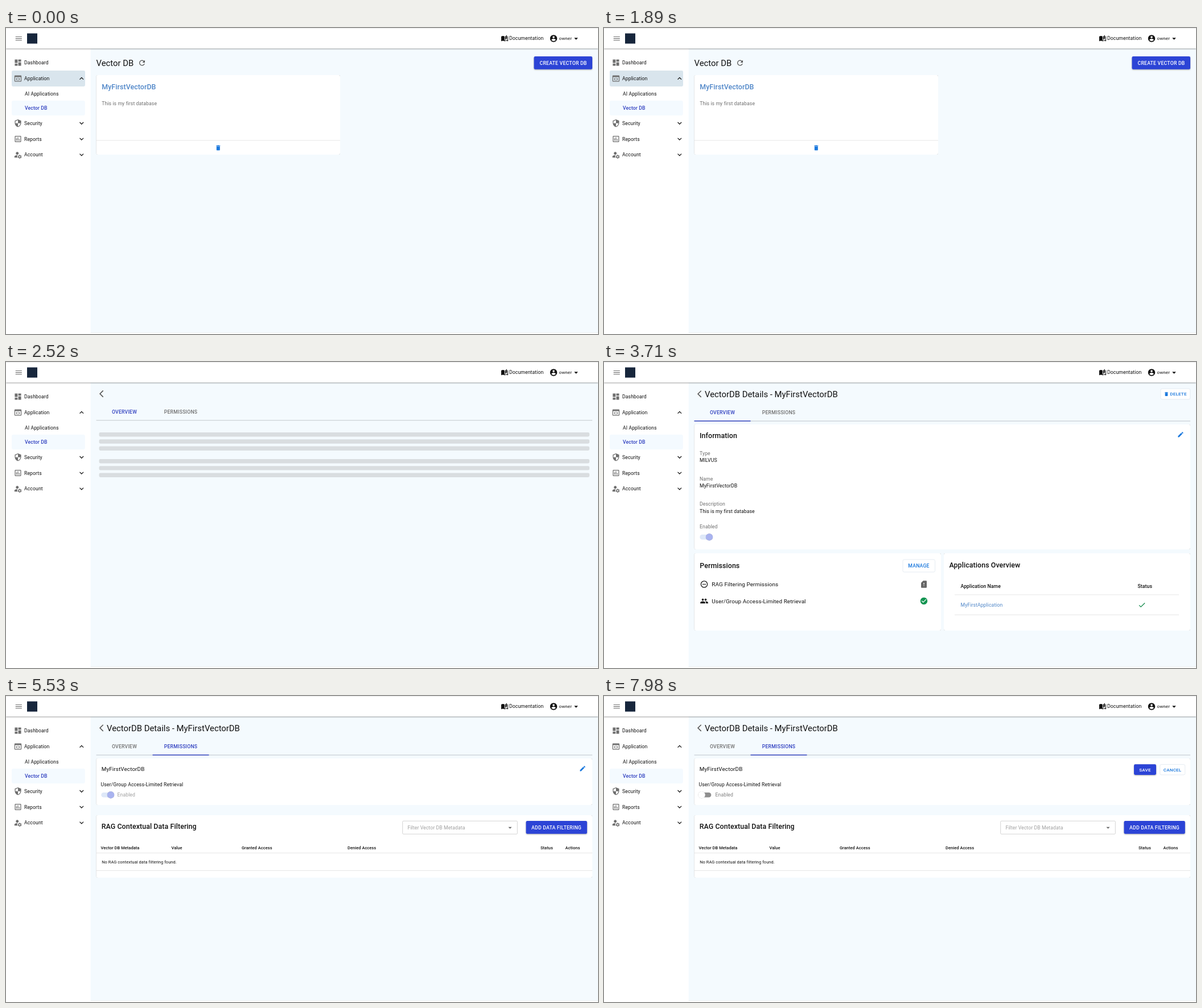
Animation of 1040 by 539 pixels, one loop 8 s. Source, as an HTML page:

```html
<!DOCTYPE html>
<html lang="en">
<head>
<meta charset="utf-8">
<title>Vector DB console</title>
<style>
html, body { margin: 0; width: 100%; height: 100%; overflow: hidden; background: #fff; }
svg { display: block; width: 1040px; height: 539px; }
text { font-family: Roboto, "Open Sans", sans-serif; white-space: pre; }
.card { fill: #fff; filter: drop-shadow(0 .8px .6px rgba(0,0,0,.36)); }
.solid { fill: #2c44d6; filter: drop-shadow(0 1px 1px rgba(0,0,0,.32)); }
.outline { fill: #fff; stroke: #dce4ec; stroke-width: .7; }
.thumb { filter: drop-shadow(0 .7px .7px rgba(0,0,0,.35)); }
</style>
</head>
<body>
<svg id="stage" viewBox="0 0 1040 539" xmlns="http://www.w3.org/2000/svg"></svg>
<script>
const LOOP = 8000, STEP = 70;
const K = 1040 / 1680; // page zoom
const BLUE = '#2f3fc0', LINK = '#4f86c8', ACTION = '#1a78dd', GREY = '#6f6f6f', INK = '#111';

const ICONS = {
  menu: 'M3 18h18v-1.7H3zM3 12.9h18v-1.7H3zM3 6v1.7h18V6z',
  dashboard: 'M3 13h8V3H3v10zm0 8h8v-6H3v6zm10 0h8V11h-8v10zm0-18v6h8V3h-8z',
  app: 'M4 3h16a2 2 0 0 1 2 2v14a2 2 0 0 1-2 2H4a2 2 0 0 1-2-2V5a2 2 0 0 1 2-2zM4 8v11h16V8zM10 9.5l1.2 1.2L8.500 13.500l2.700 2.800L10 17.500l-4-4zM14 9.500l4 4-4 4-1.200-1.200 2.700-2.800-2.700-2.800z',
  shield: 'M12 1L3 5v6c0 5.55 3.84 10.74 9 12 5.16-1.26 9-6.45 9-12V5l-9-4zm0 10.99h7c-.53 4.12-3.28 7.79-7 8.94V12H5V6.3l7-3.11v8.8z',
  report: 'M9 17H7v-7h2v7zm4 0h-2V7h2v10zm4 0h-2v-4h2v4zm2 2H5V5h14v14zm0-16H5c-1.1 0-2 .9-2 2v14c0 1.1.9 2 2 2h14c1.1 0 2-.9 2-2V5c0-1.1-.9-2-2-2z',
  account: 'M10 4a4 4 0 1 0 .01 0zM10.67 13.02c-2.700-.2-5.200.500-7.280 1.800C2.500 15.300 2 16.300 2 17.350V20h9.260c-1.500-2.300-1.600-4.700-.590-6.980zM16 12h2l.4 1.500 1.400.8 1.500-.4 1 1.700-1.100 1.100v1.600l1.100 1.100-1 1.700-1.500-.4-1.400.8L18 23h-2l-.4-1.500-1.400-.8-1.500.4-1-1.700 1.100-1.100v-1.600l-1.100-1.100 1-1.700 1.500.4 1.400-.8zM17 15.500a2 2 0 1 0 .01 0z',
  down: 'M16.59 8.59 12 13.17 7.41 8.59 6 10l6 6 6-6z',
  up: 'M12 8l-6 6 1.41 1.41L12 10.83l4.59 4.58L18 14z',
  book: 'M19 1l-5 5v11l5-4.5V1zM1 6v14.65c0 .25.25.5.5.5 1.600-.7 3.550-1.150 5-1.150 1.95 0 4.05.4 5.5 1.5V6c-1.45-1.1-3.55-1.5-5.5-1.5S2.45 4.9 1 6zm22 13.5V6c-.6-.45-1.25-.75-2-1v13.5c-1.1-.35-2.3-.5-3.5-.5-1.7 0-4.15.65-5.5 1.5v2c1.35-.85 3.8-1.5 5.5-1.5 1.65 0 3.35.3 4.75 1.05.4.1.75-.1.75-.45z',
  person: 'M12 2C6.48 2 2 6.48 2 12s4.48 10 10 10 10-4.48 10-10S17.52 2 12 2zm0 3c1.66 0 3 1.34 3 3s-1.34 3-3 3-3-1.34-3-3 1.34-3 3-3zm0 14.2c-2.5 0-4.71-1.28-6-3.22.03-1.99 4-3.08 6-3.08 1.99 0 5.97 1.09 6 3.08-1.29 1.94-3.5 3.22-6 3.22z',
  caret: 'M7 10l5 5 5-5z',
  refresh: 'M17.65 6.35C16.2 4.9 14.21 4 12 4c-4.42 0-7.99 3.58-7.99 8s3.57 8 7.99 8c3.73 0 6.84-2.55 7.73-6h-2.08c-.82 2.33-3.04 4-5.65 4-3.31 0-6-2.69-6-6s2.69-6 6-6c1.66 0 3.14.69 4.22 1.78L13 11h7V4l-2.35 2.35z',
  trash: 'M6 19c0 1.1.9 2 2 2h8c1.1 0 2-.9 2-2V7H6v12zM19 4h-3.5l-1-1h-5l-1 1H5v2h14V4z',
  pencil: 'M3 17.25V21h3.75L17.81 9.94l-3.75-3.75L3 17.25zM20.71 7.04c.39-.39.39-1.02 0-1.41l-2.34-2.34c-.39-.39-1.02-.39-1.41 0l-1.83 1.83 3.75 3.75 1.83-1.83z',
  back: 'M11.67 3.87 9.9 2.1 0 12l9.9 9.9 1.77-1.77L3.54 12z',
  minus: 'M7 11v2h10v-2H7zm5-9C6.48 2 2 6.48 2 12s4.48 10 10 10 10-4.48 10-10S17.52 2 12 2zm0 18c-4.41 0-8-3.59-8-8s3.59-8 8-8 8 3.59 8 8-3.59 8-8 8z',
  group: 'M16 11a3 3 0 1 0 0-6 3 3 0 0 0 0 6zm-8 0a3 3 0 1 0 0-6 3 3 0 0 0 0 6zm0 2c-2.33 0-7 1.17-7 3.5V19h14v-2.5c0-2.33-4.67-3.5-7-3.5zm8 0c-.29 0-.62.02-.97.05 1.16.84 1.97 1.97 1.97 3.45V19h6v-2.5c0-2.33-4.67-3.5-7-3.5z',
  alert: 'M18 2h-8L4.02 8 4 20c0 1.1.9 2 2 2h12c1.1 0 2-.9 2-2V4c0-1.1-.9-2-2-2zm-5 15h-2v-2h2v2zm0-4h-2V8h2v5z',
  done: 'M12 2C6.48 2 2 6.48 2 12s4.48 10 10 10 10-4.48 10-10S17.52 2 12 2zm-2 15l-5-5 1.41-1.41L10 14.17l7.59-7.59L19 8l-9 9z',
  check: 'M9 16.17 4.83 12l-1.42 1.41L9 19 21 7l-1.41-1.41z'
};

// Icons and text are placed by their vertical centre.
const icon = (name, cx, cy, fill = GREY, size = 24 * K) =>
  `<path d="${ICONS[name]}" fill="${fill}" fill-rule="evenodd" transform="translate(${cx - size / 2} ${cy - size / 2}) scale(${size / 24})"/>`;

function text(x, cy, str, { px = 14, fill = INK, weight = 400, space = .0107, anchor = 'start', id = '' } = {}) {
  const size = px * K;
  return `<text ${id && `id="${id}"`} x="${x}" y="${cy + size * .355}" font-size="${size}" font-weight="${weight}" ` +
    `letter-spacing="${space * size}" text-anchor="${anchor}" fill="${fill}">${str}</text>`;
}
const rect = (x, y, x2, y2, fill, r = 0) =>
  `<rect x="${x}" y="${y}" width="${x2 - x}" height="${y2 - y}" rx="${r}" fill="${fill}"/>`;
const box = (cls, x, y, x2, y2) =>
  `<rect class="${cls}" x="${x}" y="${y}" width="${x2 - x}" height="${y2 - y}" rx="2.4"/>`;
const line = (x, x2, y, color = '#e0e0e0', w = .8) => rect(x, y - w / 2, x2, y + w / 2, color);
const heading = (x, y, s, fill = INK) => text(x, y, s, { px: 20, weight: 500, space: .0075, fill });
const title = (x, y, s) => text(x, y, s, { px: 24, space: 0 });
const caps = (cx, cy, s, fill, opt = {}) =>
  text(cx, cy, s, { fill, weight: 500, space: .026, anchor: 'middle', ...opt });
const group = (id, body) => `<g id="${id}">${body}</g>`;
const toggle = (id, x, y) => group(id,
  `<rect x="${x}" y="${y - 4.3}" width="21" height="8.6" rx="4.3"/><circle class="thumb" cy="${y}" r="6.2"/>`);

function shell() {
  const nav = [['dashboard', 'Dashboard', 61], ['app', 'Application', 89, 'up'], ['shield', 'Security', 167.7, 'down'],
    ['report', 'Reports', 195.5, 'down'], ['account', 'Account', 223.3, 'down']];
  return rect(0, 0, 1040, 539, '#fff') + rect(148.6, 30, 1040, 536, '#f4fafe') + line(148.600, 1040, 536.5, '#eceff1', 1) +
    `<rect width="1040" height="36" fill="#fff" style="filter:drop-shadow(0 1px 1px rgba(0,0,0,.38))"/>` +
    line(0, 1040, .5, '#ebebeb', 1) +
    icon('menu', 22.3, 18.6) + rect(37, 9.5, 55, 27.5, '#17263c') +
    icon('book', 876, 18.2, INK, 13.2) + text(884, 18.2, 'Documentation') +
    icon('person', 962, 18.5, INK) + text(971.5, 18.2, 'owner', { px: 13 }) + icon('caret', 1001.500, 18.7, INK, 16) +
    group('active', rect(10, 75, 139, 103, '#d9e5ed', 2.4)) + rect(10, 128, 138.7, 154, '#f4faff', 2.4) +
    nav.map(([ic, label, y, arrow]) =>
      icon(ic, 21, y) + text(32, y, label) + (arrow ? icon(arrow, 132.8, y, INK) : '')).join('') +
    text(33, 115.5, 'AI Applications') + text(33, 141, 'Vector DB', { fill: BLUE, weight: 500 });
}

const listPage = () => title(158.5, 61.5, 'Vector DB') + icon('refresh', 239, 61.5, '#555') +
  box('solid', 927.5, 50, 1030, 72.800) + caps(979, 61.5, 'CREATE VECTOR DB', '#fff') +
  box('card', 158.5, 83, 587, 223) + heading(168.3, 103.500, 'MyFirstVectorDB', LINK) +
  text(168.3, 132.7, 'This is my first database', { fill: GREY }) +
  line(158.5, 587, 198) + icon('trash', 372.8, 211, ACTION, 12);

function loadingPage() {
  const bars = [124, 136.3, 148.6, 171, 183.2, 195.6];
  return icon('back', 171.4, 56, '#555') + caps(208, 87.5, 'OVERVIEW', BLUE) + caps(307, 87.5, 'PERMISSIONS', GREY) +
    line(158.5, 1030, 102.7, '#cfd4d8', 1.3) +
    bars.map(y => rect(163.5, y, 1025, y + 7.4, '#d9dde0', 2.4)).join('');
}

const detailHead = () => icon('back', 171.4, 56.3, '#555') + title(177, 56.5, 'VectorDB Details - MyFirstVectorDB') +
  caps(208, 88.8, 'OVERVIEW', BLUE, { id: 'tab0' }) + caps(307, 88.8, 'PERMISSIONS', GREY, { id: 'tab1' }) +
  line(158.5, 1030, 104, '#c9ced4', 1.2) + `<rect id="marker" y="103.2" width="99" height="1.4" fill="${BLUE}"/>`;

function overviewPage() {
  const fields = [['Type', 'MILVUS', 161], ['Name', 'MyFirstVectorDB', 205.7], ['Description', 'This is my first database', 250.4]];
  return box('outline', 978, 47, 1029.700, 65.7) + icon('trash', 988, 56.5, ACTION, 9.5) + caps(1009, 56.5, 'DELETE', ACTION, { px: 13 }) +
    box('card', 158.5, 110, 1030, 330) + heading(168, 130, 'Information') + icon('pencil', 1013, 127.8, ACTION, 12.4) +
    fields.map(([k, v, y]) => text(168, y, k, { fill: GREY }) + text(168, y + 12.4, v)).join('') +
    text(168, 290, 'Enabled', { fill: GREY }) + toggle('infoSwitch', 168.3, 308.4) +
    box('card', 158.5, 337, 592, 473) + heading(168.3, 359, 'Permissions') +
    box('outline', 525, 348, 581.5, 370) + caps(553, 359, 'MANAGE', ACTION) +
    icon('minus', 176, 391.5, INK) + text(189.3, 391.5, 'RAG Filtering Permissions', { px: 16 }) + icon('alert', 562, 391.5, '#666') +
    icon('group', 176, 421, INK) + text(189.3, 421.2, 'User/Group Access-Limited Retrieval', { px: 16 }) + icon('done', 562, 421, '#149552') +
    box('card', 597, 337, 1030, 473) + heading(606.5, 357.5, 'Applications Overview') +
    text(626.5, 394.9, 'Application Name', { weight: 500 }) + text(937.5, 394.9, 'Status', { weight: 500 }) +
    line(616, 1010, 410) + text(626.5, 428, 'MyFirstApplication', { fill: LINK }) +
    icon('check', 945, 428, '#158a4c') + line(616, 1010, 445.3);
}

function permissionsPage() {
  const cols = [['Vector DB Metadata', 166.5], ['Value', 290.5], ['Granted Access', 414], ['Denied Access', 600], ['Status', 939], ['Actions', 982.5]];
  return box('card', 158.5, 110, 1030, 192) + text(167.7, 128, 'MyFirstVectorDB', { px: 16 }) +
    text(166.5, 156.2, 'User/Group Access-Limited Retrieval') +
    toggle('accessSwitch', 167.3, 174.2) + text(195.5, 174.3, 'Enabled', { id: 'enabled' }) +
    group('edit', icon('pencil', 1013, 127.8, ACTION, 12.4)) +
    group('actions', box('solid', 931, 120.300, 970, 139) + caps(950.5, 129.700, 'SAVE', '#fff', { px: 13 }) +
      box('outline', 976.7, 120.6, 1020.7, 138.9) + caps(998.600, 129.700, 'CANCEL', ACTION, { px: 13 })) +
    box('card', 158.5, 210, 1030, 320) + heading(167.7, 230, 'RAG Contextual Data Filtering') +
    `<rect x="696.7" y="220.2" width="201.6" height="23" rx="1.5" fill="#fff" stroke="#c2c2c2" stroke-width=".7"/>` +
    text(705.5, 231.7, 'Filter Vector DB Metadata', { fill: '#a0a0a0' }) + icon('caret', 885.5, 231.900, '#666') +
    box('solid', 913.5, 220, 1020.8, 242.8) + caps(967, 231.5, 'ADD DATA FILTERING', '#fff') +
    cols.map(([s, x]) => text(x, 267, s, { px: 12, weight: 500 })).join('') +
    line(158.5, 1030, 276.5) + text(168.2, 292.3, 'No RAG contextual data filtering found.', { px: 12 }) + line(158.5, 1030, 307.5);
}

const $ = id => document.getElementById(id);
$('stage').innerHTML = shell() + group('list', listPage()) + group('loading', loadingPage()) +
  group('detail', detailHead() + group('overview', overviewPage()) + group('permissions', permissionsPage()));

// cubic-bezier(.4, 0, .2, 1)
function ease(p) {
  if (p <= 0) return 0;
  if (p >= 1) return 1;
  let lo = 0, hi = 1, u = .5;
  for (let i = 0; i < 24; i++) {
    u = (lo + hi) / 2;
    const x = 1.2 * u * (1 - u) ** 2 + .6 * u * u * (1 - u) + u ** 3;
    if (x < p) lo = u; else hi = u;
  }
  return u * u * (3 - 2 * u);
}
const mix = (a, b, p) => `rgb(${a.map((v, i) => Math.round(v + (b[i] - v) * p))})`;
const show = (id, on) => $(id).setAttribute('display', on ? 'inline' : 'none');
const PALE = { thumb: [169, 179, 239], track: [222, 232, 248] };
const ON = { thumb: [44, 68, 214], track: [130, 184, 245] };
const OFF = { thumb: [255, 255, 255], track: [143, 143, 143] };

function setSwitch(id, from, to, p, cx) {
  const [track, thumb] = $(id).children;
  track.setAttribute('fill', mix(from.track, to.track, p));
  thumb.setAttribute('fill', mix(from.thumb, to.thumb, p));
  thumb.setAttribute('cx', cx);
}

const OPEN = 2450, LOADED = 2590, TAB = 3920, EDIT = 5880, FLIP = 7070;

function render(now) {
  const t = Math.floor((now % LOOP) / STEP) * STEP;
  const onPermissions = t >= TAB, editing = t >= EDIT;
  show('active', t < OPEN);
  show('list', t < OPEN);
  show('loading', t >= OPEN && t < LOADED);
  show('detail', t >= LOADED);
  show('overview', !onPermissions);
  show('permissions', onPermissions);
  show('edit', !editing);
  show('actions', editing);

  $('tab0').setAttribute('fill', onPermissions ? GREY : BLUE);
  $('tab1').setAttribute('fill', onPermissions ? BLUE : GREY);
  $('marker').setAttribute('x', 158.5 + 99 * ease((t - TAB) / 300));
  $('enabled').setAttribute('fill', editing ? '#808080' : '#a0a0a0');

  const flip = ease((t - FLIP) / 150);
  if (t < FLIP) setSwitch('accessSwitch', PALE, ON, ease((t - EDIT) / 150), 184);
  else setSwitch('accessSwitch', ON, OFF, flip, 184 - 12.4 * flip);
}

setSwitch('infoSwitch', PALE, PALE, 0, 185);
const start = performance.now();
function loop() {
  render(performance.now() - start);
  requestAnimationFrame(loop);
}
loop();
</script>
</body>
</html>
```
